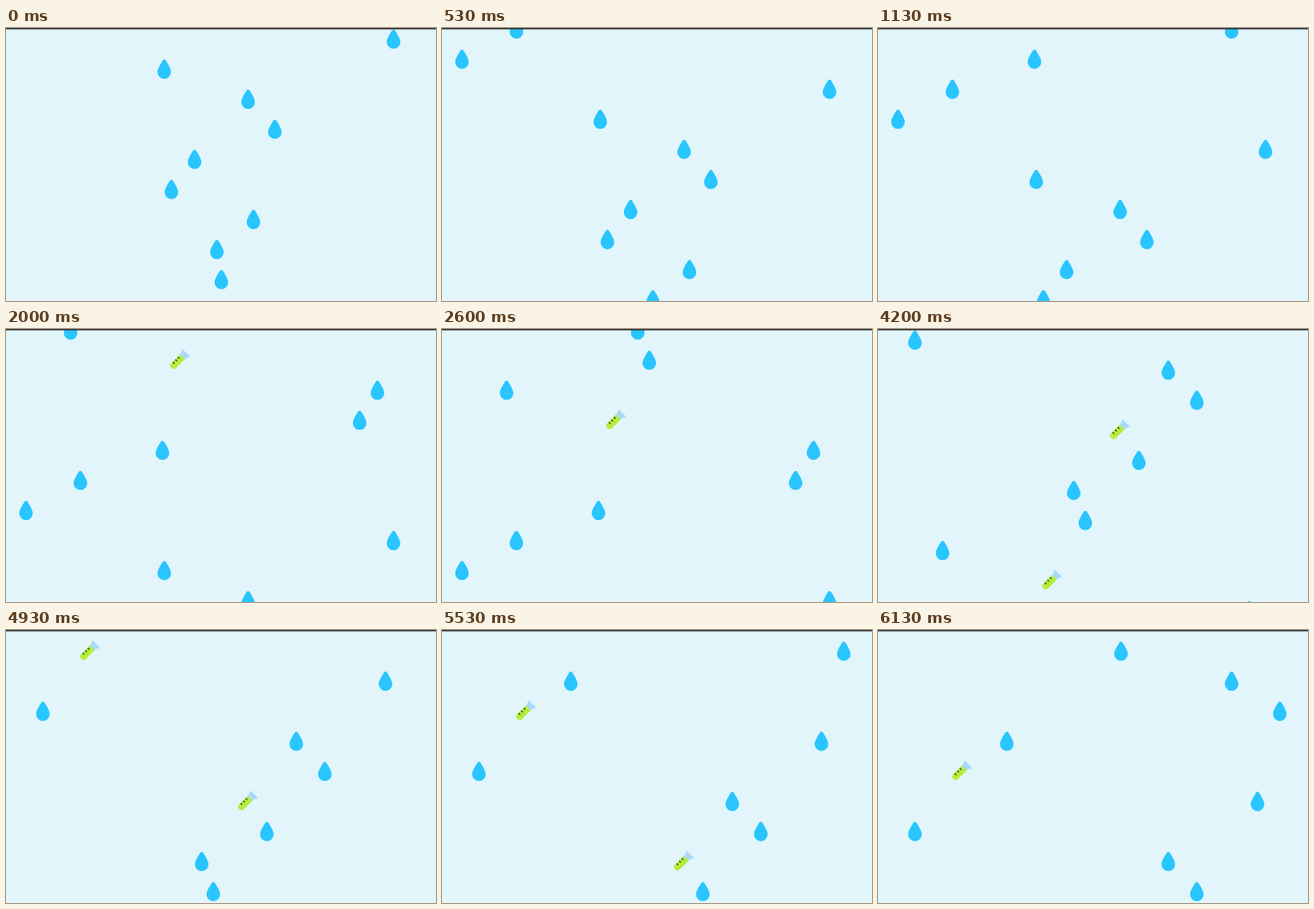
Animation, 482 px wide and 306 px high, one loop 6270 ms. Source, as an HTML page with a canvas:

```html
<!DOCTYPE html>
<html lang="en">
<head>
<meta charset="utf-8">
<title>Falling drops</title>
<style>
  html, body { margin: 0; width: 100%; height: 100%; overflow: hidden; background: #e1f5fb; }
  canvas { display: block; }
</style>
</head>
<body>
<canvas width="482" height="306"></canvas>
<script>
const ctx = document.querySelector('canvas').getContext('2d');
const LOOP = 6270, TICK = 100;
const FALL = 11.23;         // px per tick
const SPACING = 3 * FALL;   // a new item enters every third tick
const FIRST_Y = 282.2;

// Where each item falls, lowest item first.
const columns = [241, 236, 277, 185, 211, 301, 271, 177, 434, 22, 83, 175, 396, 416, 194,
  72, 232, 219, 292, 270, 357, 325, 41, 425, 93, 144, 450, 396, 272];
const isTube = i => i > 9 && i % 5 === 4;

const dropShape = new Path2D('M0-11C1-11 1.6-10.2 2.2-9.2 4.5-5.2 7.6-.9 7.6 3' +
  'A7.6 7.6 0 1 1-7.6 3C-7.6-.9-4.5-5.2-2.2-9.2-1.6-10.2-1-11 0-11Z');
const liquid = new Path2D('M4.5-3.8H-9A3.8 3.8 0 0 0-9 3.8H4.5Z');
const glass = new Path2D('M4-3.8H7L9-5.4H11V5.4H9L7 3.8H4Z');
const marks = new Path2D('M-7-3.4V-.9M-3-3.4V-.9M1-3.4V-.9');

function fill(shape, color) {
  ctx.fillStyle = color;
  ctx.fill(shape);
}

function drawTube() {
  ctx.translate(0, -0.6);
  ctx.rotate(-Math.PI / 4);
  fill(glass, '#aad9f8');
  fill(liquid, '#b5ed3c');
  ctx.strokeStyle = '#38561f';
  ctx.lineWidth = 1.4;
  ctx.stroke(marks);
}

function drawItem(i, y) {
  ctx.save();
  ctx.translate(columns[i] + 0.4, y);
  if (isTube(i)) drawTube();
  else fill(dropShape, '#29c5fe');
  ctx.restore();
}

function draw(ms) {
  const ticks = Math.floor((ms + 5) / TICK);
  ctx.fillStyle = '#e1f5fb';
  ctx.fillRect(0, 0, 482, 306);
  columns.forEach((_, i) => drawItem(i, FIRST_Y + ticks * FALL - i * SPACING));
  ctx.fillStyle = '#2a3439';
  ctx.fillRect(0, 0, 482, 1.5);
}

const start = performance.now();
function animate() {
  draw((performance.now() - start) % LOOP);
  requestAnimationFrame(animate);
}
animate();
</script>
</body>
</html>
```
